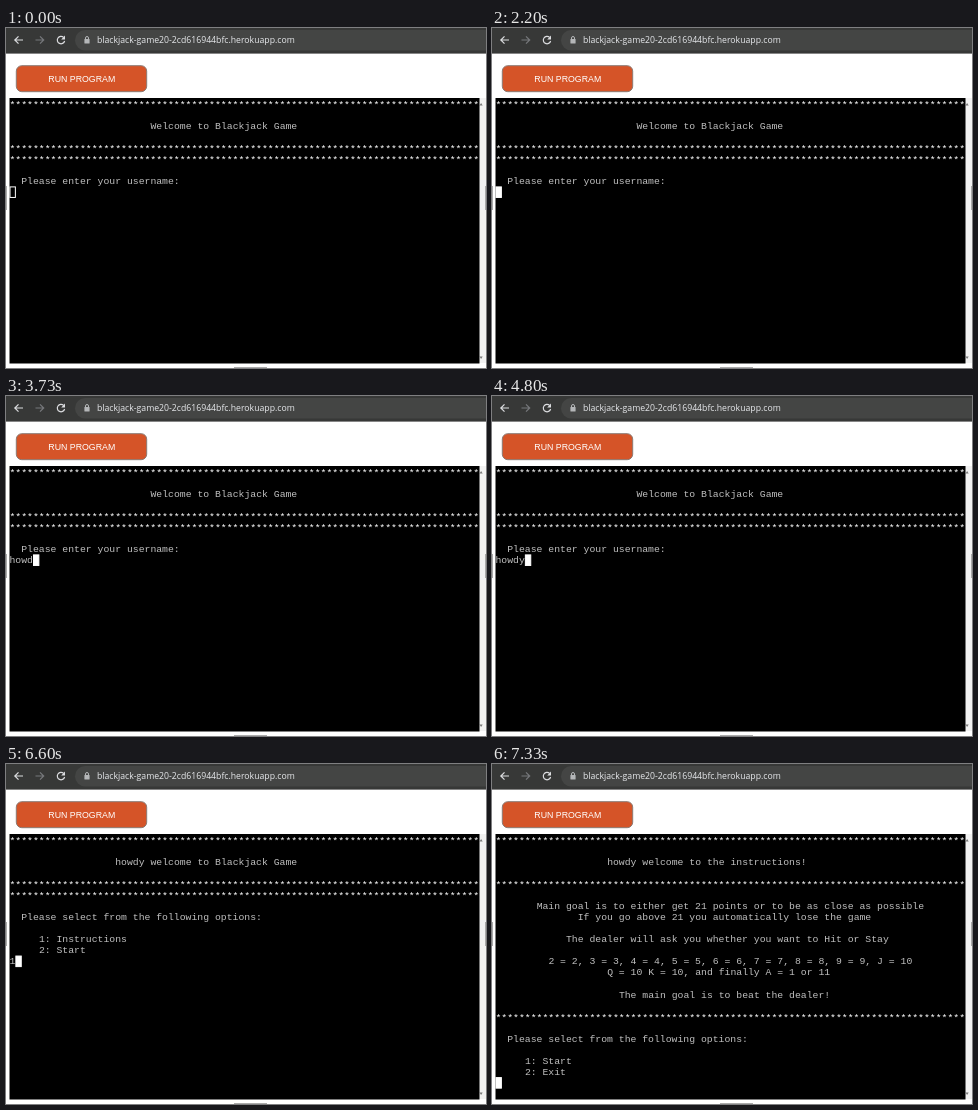
Animation, 480 px wide and 340 px high, one loop 8 s. Source, as an HTML page:

```html
<!DOCTYPE html>
<html lang="en">
<head>
<meta charset="utf-8">
<title>Blackjack terminal</title>
<style>
  html, body { margin: 0; width: 100%; height: 100%; overflow: hidden; background: #fff; }
  svg { display: block; }
  .url { font: 8.7px "Open Sans", sans-serif; fill: #e8eaed; }
  .label { font: 8.8px "Liberation Sans", sans-serif; fill: #fff; }
  .term { font: 9.79px "Liberation Mono", monospace; fill: #c0c0c0; white-space: pre; }
  .term .stars { fill: #fff; }
  .icon { fill: none; stroke: #dcdde0; stroke-width: 1.2; }
</style>
</head>
<body>
<svg width="480" height="340" viewBox="0 0 480 340">
  <rect width="480" height="340" fill="#fff"/>

  <rect width="480" height="25.6" fill="#373837"/>
  <rect x="69" y="2" width="430" height="20.5" rx="10.2" fill="#444544"/>
  <path class="icon" d="M17 12H9M12.5 8.3L8.8 12L12.5 15.7"/>
  <path class="icon" d="M29.5 12H37.5M34 8.3L37.7 12L34 15.7" style="stroke:#77787c"/>
  <path class="icon" d="M57.6 9.4A3.7 3.7 0 1 0 58.6 13"/>
  <path d="M59 7.6V11.4H55.2Z" fill="#dcdde0"/>
  <rect x="78.4" y="11" width="5.2" height="4.6" rx=".6" fill="#b4b6b8"/>
  <path d="M79.5 11V10a1.5 1.5 0 0 1 3 0V11" fill="none" stroke="#b4b6b8"/>
  <text class="url" x="91" y="15">blackjack-game20-2cd616944bfc.herokuapp.com</text>

  <rect x="10.3" y="37.7" width="130.4" height="26" rx="5.5" fill="#d55428" stroke="#8a7a74"/>
  <text class="label" x="42.3" y="53.6">RUN PROGRAM</text>

  <rect x="473" y="70" width="7" height="265" fill="#f1f1f1"/>
  <path d="M473.5 77.5L475.1 75L476.7 77.5ZM473.5 328.5L475.1 331L476.7 328.5Z" fill="#777"/>
  <path d="M.5 158V182M479.5 158V182M228 339.5H261" stroke="#aaa"/>
  <rect x="3.5" y="70" width="470" height="265.5" fill="#000"/>
  <g class="term" id="screen"></g>
  <rect id="cursor" stroke="#fff"/>
</svg>
<script>
const LOOP = 8000, LEFT = 3.5, TOP = 70, COL = 5.875, ROW = 11.05;
const STARS = '*'.repeat(80);
const user = 'howdy';

// Each line: [row, column, text]
const header = [[0, 0, STARS], [4, 0, STARS], [5, 0, STARS]];
const select = 'Please select from the following options:';
const welcome = [...header,
  [2, 24, 'Welcome to Blackjack Game'],
  [7, 2, 'Please enter your username:']];
const menu = [...header,
  [2, 18, user + ' welcome to Blackjack Game'],
  [7, 2, select],
  [9, 5, '1: Instructions'],
  [10, 5, '2: Start']];
const instructions = [
  [0, 0, STARS],
  [2, 19, user + ' welcome to the instructions!'],
  [4, 0, STARS],
  [6, 7, 'Main goal is to either get 21 points or to be as close as possible'],
  [7, 14, 'If you go above 21 you automatically lose the game'],
  [9, 12, 'The dealer will ask you whether you want to Hit or Stay'],
  [11, 9, '2 = 2, 3 = 3, 4 = 4, 5 = 5, 6 = 6, 7 = 7, 8 = 8, 9 = 9, J = 10'],
  [12, 19, 'Q = 10 K = 10, and finally A = 1 or 11'],
  [14, 21, 'The main goal is to beat the dealer!'],
  [16, 0, STARS],
  [18, 2, select],
  [20, 5, '1: Start'],
  [21, 5, '2: Exit']];

// Each step: start time, page, input row, typed text, enter pressed, focused
const step = (at, page, row, typed = '', enter = false, focused = true) =>
  ({ at, page, row, typed, enter, focused });
const steps = [
  step(0, welcome, 8, '', false, false),
  step(400, welcome, 8),
  ...[3200, 3400, 3600, 3730, 3800].map((at, i) =>
    step(at, welcome, 8, user.slice(0, i + 1))),
  step(4930, welcome, 8, user, true),
  step(5000, menu, 11),
  step(6530, menu, 11, '1'),
  step(7270, menu, 11, '1', true),
  step(7330, instructions, 22)];

const screen = document.getElementById('screen');
const cursor = document.getElementById('cursor');

function setAttributes(el, attributes) {
  for (const name in attributes) el.setAttribute(name, attributes[name]);
}

function printLine([row, col, text]) {
  const stars = text === STARS;
  const el = document.createElementNS('http://www.w3.org/2000/svg', 'text');
  setAttributes(el, {
    x: LEFT + col * COL,
    y: TOP + row * ROW + (stars ? 9.8 : 8.8),
    class: stars ? 'stars' : 'line'
  });
  el.textContent = text;
  return el;
}

function show({ page, row, typed, enter, focused }) {
  screen.replaceChildren(...[...page, [row, 0, typed]].map(printLine));
  const col = enter ? 0 : typed.length;
  const line = enter ? row + 1 : row;
  setAttributes(cursor, {
    x: LEFT + col * COL + .5,
    y: TOP + line * ROW + .5,
    width: COL - .5,
    height: ROW - .5,
    fill: focused ? '#fff' : 'none'
  });
}

const start = performance.now();
let current;
function tick() {
  const time = (performance.now() - start) % LOOP;
  const next = steps.findLast(s => s.at <= time);
  if (next !== current) show(current = next);
  requestAnimationFrame(tick);
}
tick();
</script>
</body>
</html>
```
